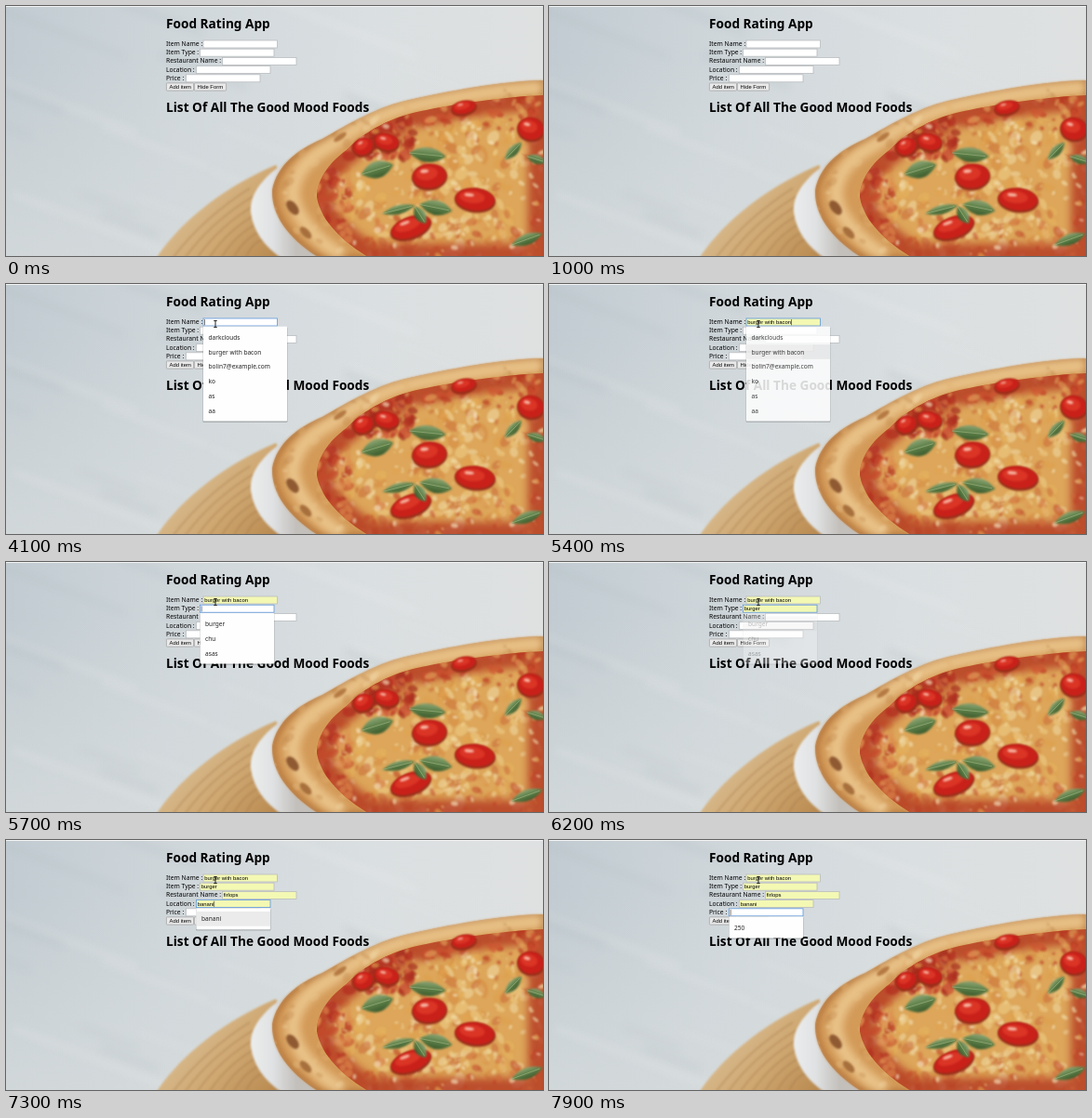
An HTML page with a canvas for the animation above (8000 ms loop, 577x269 px).

```html
<!DOCTYPE html>
<html lang="en">
<head>
<meta charset="utf-8">
<title>Food Rating App</title>
<style>
html, body { margin: 0; width: 577px; height: 269px; overflow: hidden; }
canvas, svg { position: absolute; left: 0; top: 0; }
.head { font: bold 13.65px "Noto Sans", sans-serif; }
.label { font: 6.75px "Noto Sans", sans-serif; }
.option { font: 6.55px "Noto Sans", sans-serif; }
.control { font: 5.9px "Liberation Sans", sans-serif; }
</style>
</head>
<body>
<canvas id="photo" width="577" height="269"></canvas>
<svg id="page" width="577" height="269"></svg>
<script>
const W = 577, H = 269, LOOP = 8000;
const ctx = document.getElementById('photo').getContext('2d');
const page = document.getElementById('page');

let seed = 11;
const rnd = () => (seed = (seed * 16807) % 2147483647) / 2147483647;

// ---------- backdrop ----------
function gradient(x0, y0, x1, y1, colors) {
  const g = ctx.createLinearGradient(x0, y0, x1, y1);
  colors.forEach((c, i) => g.addColorStop(i / (colors.length - 1), c));
  return g;
}

function fillPath(d, fill) {
  ctx.fillStyle = fill;
  ctx.fill(new Path2D(d));
}

function strokePath(d, color, width, blur = 0) {
  ctx.save();
  ctx.filter = `blur(${blur}px)`;
  ctx.strokeStyle = color;
  ctx.lineWidth = width;
  ctx.stroke(new Path2D(d));
  ctx.restore();
}

function ellipse(x, y, rx, ry, angle, fill) {
  ctx.fillStyle = fill;
  ctx.beginPath();
  ctx.ellipse(x, y, rx, ry, angle, 0, 7);
  ctx.fill();
}

function scatter(count, colors, [x, y, w, h], min, max, alpha) {
  ctx.globalAlpha = alpha;
  for (let i = 0; i < count; i++) {
    const r = min + rnd() * (max - min);
    ellipse(x + rnd() * w, y + rnd() * h, r, r * (0.4 + rnd() * 0.4), rnd() * 3,
      colors[Math.floor(rnd() * colors.length)]);
  }
  ctx.globalAlpha = 1;
}

function clipped(d, draw) {
  ctx.save();
  ctx.clip(new Path2D(d));
  draw();
  ctx.restore();
}

function tomato(x, y, rx, ry, angle) {
  ellipse(x, y + 1.5, rx + 1, ry + 1, angle, '#94301a');
  ellipse(x, y, rx, ry, angle, '#c9211a');
  ellipse(x - rx * 0.15, y - ry * 0.2, rx * 0.65, ry * 0.55, angle, '#db3526');
  ellipse(x - rx * 0.3, y - ry * 0.4, rx * 0.25, ry * 0.15, angle, '#f7b3a0');
}

function leaf(x, y, length, width, angle) {
  ctx.save();
  ctx.translate(x, y);
  ctx.rotate(angle);
  fillPath(`M${-length} 0Q0 ${-width * 2} ${length} 0Q0 ${width * 2} ${-length} 0`,
    gradient(0, -width, 0, width, ['#8ba574', '#5d7f48', '#3a5a2c']));
  strokePath(`M${-length} 0H${length * 0.8}`, '#a3b786', 0.6);
  ctx.restore();
}

function drawTable() {
  ctx.fillStyle = gradient(0, 20, W, 60, ['#c1cbd1', '#d0d7db', '#dadfe1', '#dfe1e1']);
  ctx.fillRect(0, 0, W, H);
  ctx.fillStyle = gradient(0, 60, 0, H, ['rgba(214,219,220,0)', 'rgba(214,219,220,.75)']);
  ctx.fillRect(0, 0, W, H);
  for (let i = 0; i < 24; i++) {
    const x = rnd() * 520 - 80, y = rnd() * 290 - 30, len = 60 + rnd() * 150;
    strokePath(`M${x} ${y}l${len} ${len * 0.38}`,
      i % 2 ? 'rgba(240,243,243,.18)' : 'rgba(150,162,172,.13)', 3 + rnd() * 6, 4);
  }

  ctx.filter = 'blur(1px)';
  fillPath('M161 272C180 242 222 200 290 171L345 272Z',
    gradient(200, 190, 290, 269, ['#d9bd93', '#cfa872', '#b98a50']));
  for (let i = 0; i < 7; i++) {
    strokePath(`M${180 + i * 13} 270Q${212 + i * 9} ${228 + i * 4} ${262 + i * 3} ${196 + i * 9}`,
      'rgba(150,104,58,.3)', 1.5, 1);
  }
  fillPath('M310 162C278 180 261 202 263 222Q267 252 297 272H360Z',
    gradient(262, 0, 312, 0, ['#eceeee', '#dfe1e2', '#c3c0bc']));
}

function drawPizza() {
  const crust = 'M577 80C530 81 475 92 434 101C400 108 368 127 340 143' +
    'C312 155 291 172 286 198C285 225 303 250 338 272H577Z';
  const ridge = 'M577 87C530 89 478 98 440 106C405 113 375 130 352 148' +
    'C325 162 309 180 308 202C310 225 330 250 362 270';
  const filling = 'M577 96C530 98 480 106 446 113C415 119 385 135 366 155' +
    'C345 170 334 188 334 206C338 228 356 250 392 272H577Z';

  ctx.filter = 'blur(.9px)';
  fillPath(crust, '#d39a58');
  clipped(crust, () => {
    strokePath(crust, 'rgba(165,100,48,.6)', 8, 3);
    strokePath(ridge, 'rgba(240,208,154,.75)', 15, 4);
    scatter(190, ['#f0d6a6', '#e9c48a', '#c48a4c', '#e2b273', '#b67a42'],
      [283, 78, 294, 192], 2, 7, 0.35);
    ellipse(308, 217, 9, 5, 0.9, '#8f5931');
    ellipse(322, 244, 8, 4, 0.8, '#a66f3c');
    ellipse(359, 141, 8, 3, -0.6, '#b57a43');
  });

  fillPath(filling, '#dda65a');
  clipped(filling, () => {
    scatter(330, ['#efd08a', '#e6b55f', '#d58a42', '#f1dca8', '#dfa14c', '#c86a38'],
      [335, 95, 242, 175], 3, 9, 0.55);
    strokePath(filling, 'rgba(176,48,30,.75)', 32, 4);
    scatter(75, ['#b02c1f', '#c8452c', '#9f271b', '#d56d43'], [362, 122, 75, 42], 3, 8, 0.65);
    scatter(50, ['#b02c1f', '#c54a2c', '#dd8a4f'], [332, 172, 38, 90], 2, 7, 0.6);
    scatter(50, ['#b8331f', '#cf5230', '#e2a55c'], [425, 98, 152, 35], 2, 7, 0.6);
    scatter(36, ['#bd3f26', '#cf6838'], [385, 225, 190, 42], 2, 7, 0.5);
    scatter(170, ['#f8eac6', '#f0d795', '#e2a450', '#f4e2b4'], [350, 125, 227, 145], 1, 4, 0.6);
  });

  tomato(409, 146, 13, 9, 0.2);
  tomato(384, 151, 11, 9, -0.5);
  tomato(492, 109, 13, 7, -0.2);
  tomato(564, 132, 14, 12, 0.2);
  tomato(455, 183, 18, 13, -0.1);
  tomato(504, 208, 21, 12, 0.1);
  tomato(435, 238, 22, 11, -0.35);

  leaf(399, 176, 18, 9, -0.3);
  leaf(453, 160, 20, 8, 0.1);
  leaf(545, 156, 13, 5, -0.8);
  leaf(570, 165, 11, 5, 0.3);
  leaf(462, 217, 18, 8, 0.2);
  leaf(422, 219, 18, 5, -0.25);
  leaf(445, 225, 11, 6, 1);
  leaf(560, 251, 18, 6, -0.35);
}

function drawPhoto() {
  drawTable();
  drawPizza();
  ctx.filter = 'none';
  ctx.fillStyle = '#f3f3f3';
  ctx.fillRect(0, 0, W, 1);
}

// ---------- form ----------
const ROW_TOP = 36.6, ROW = 9.2, BOX_W = 79.5, BOX_H = 8.8, ITEM_H = 15.8;
const NEVER = 9999;

// Times in ms: focus, list open, choice highlighted, list fading, focus lost.
const fields = [
  { label: 'Item Name :', x: 212, listW: 90, pick: 1, times: [4100, 4100, 5100, 5400, 5600],
    options: ['darkclouds', 'burger with bacon', 'bolin7@example.com', 'ko', 'as', 'aa'] },
  { label: 'Item Type :', x: 208.5, pick: 0, times: [5600, 5600, 5800, 6100, 6300],
    options: ['burger', 'chu', 'asas'] },
  { label: 'Restaurant Name :', x: 232.5, pick: 0, times: [6300, 6500, 6700, 6800, 7000],
    options: ['firlops'] },
  { label: 'Location :', x: 204.5, pick: 0, times: [7000, 7100, 7300, 7400, 7600],
    options: ['banani'] },
  { label: 'Price :', x: 193.5, pick: 0, times: [7600, 7700, NEVER, NEVER, NEVER],
    options: ['250'] },
];

const pointerPath = [
  [2800, 118.5, 24], [2900, 190, 48], [3200, 179, 44], [3300, 240, 43],
  [3400, 285, 44], [3700, 250, 43], [3800, 219, 43], [3900, 225, 43],
];

const ruler = document.createElement('canvas').getContext('2d');
ruler.font = '5.9px "Liberation Sans", sans-serif';

const text = (cls, x, y, str, fill = '#000') =>
  `<text class="${cls}" x="${x}" y="${y}" fill="${fill}">${str}</text>`;
const rect = (x, y, w, h, fill, extra = '') =>
  `<rect x="${x}" y="${y}" width="${w}" height="${h}" fill="${fill}" ${extra}/>`;

// Arrowing down passes the first option on the way to the chosen one.
const choiceAt = (field, t) => t < field.times[2] + 100 ? 0 : field.pick;

function fieldMarkup(field, row, t) {
  const [focus, , highlight, , blur] = field.times;
  const y = ROW_TOP + row * ROW, { x } = field;
  const filled = t >= highlight, focused = t >= focus && t < blur;
  const value = filled ? field.options[choiceAt(field, t)] : '';
  let out = text('label', 172, y + 6.4, field.label) +
    rect(x, y + 0.4, BOX_W, BOX_H - 0.8, filled ? '#f3f8b3' : '#fff',
      `stroke="${focused ? '#5d97dc' : '#b9bcbf'}" stroke-width=".8"`) +
    text('control', x + 1.2, y + 6.3, value);
  if (focused && (t - focus) % 1000 < 600) {
    out += rect(x + 1.3 + ruler.measureText(value).width, y + 1.5, 0.6, 6.2, '#222');
  }
  return out;
}

function listMarkup(field, row, t) {
  const [, open, highlight, fade] = field.times;
  if (t < open || t >= fade + 200) return '';
  const alpha = t < fade ? 1 : t < fade + 100 ? 0.85 : 0.3;
  const x = field.x, y = ROW_TOP + row * ROW + 9.2;
  const w = field.listW || BOX_W, h = field.options.length * ITEM_H + 7;
  let out = rect(x - 0.5, y + 0.7, w + 1, h + 0.6, 'rgba(0,0,0,.2)', 'rx="1"') +
    rect(x, y, w, h, '#fefefe', 'rx=".8"');
  if (t >= highlight) {
    out += rect(x, y + 3.5 + choiceAt(field, t) * ITEM_H, w, ITEM_H, '#ebebeb');
  }
  field.options.forEach((option, i) => {
    out += text('option', x + 5.6, y + 14 + i * ITEM_H, option, '#222');
  });
  return `<g opacity="${alpha}">${out}</g>`;
}

function buttonMarkup(x, w, label) {
  return rect(x + 0.4, 82.9, w - 0.8, 8.2, '#e9e9e9', 'rx=".8" stroke="#a6a6a6" stroke-width=".8"') +
    text('control', x + 3.6, 89.2, label);
}

function pointerMarkup(t) {
  const at = pointerPath.filter(p => t >= p[0]).pop();
  if (!at) return '';
  const [start, x, y] = at;
  const shape = start === pointerPath[0][0]
    ? '<path d="M0 0V7.3L1.8 5.7 3 8.5 4.3 7.9 3.1 5.3H5.4Z" fill="#fff" stroke="#222" stroke-width=".8"/>'
    : '<path d="M-1.7-3.5H1.7M0-3.5V3.5M-1.7 3.5H1.7" fill="none" stroke="#222"/>';
  return `<g transform="translate(${x} ${y})">${shape}</g>`;
}

function render(t) {
  page.innerHTML =
    text('head', 172, 23.8, 'Food Rating App') +
    text('head', 172, 114, 'List Of All The Good Mood Foods') +
    fields.map((f, i) => fieldMarkup(f, i, t)).join('') +
    buttonMarkup(172, 30, 'Add item') +
    buttonMarkup(202, 35, 'Hide Form') +
    fields.map((f, i) => listMarkup(f, i, t)).join('') +
    pointerMarkup(t);
}

let shown = -1;
function tick() {
  const t = Math.floor((performance.now() % LOOP) / 100) * 100;
  if (t !== shown) render(shown = t);
  requestAnimationFrame(tick);
}

drawPhoto();
tick();
</script>
</body>
</html>
```
